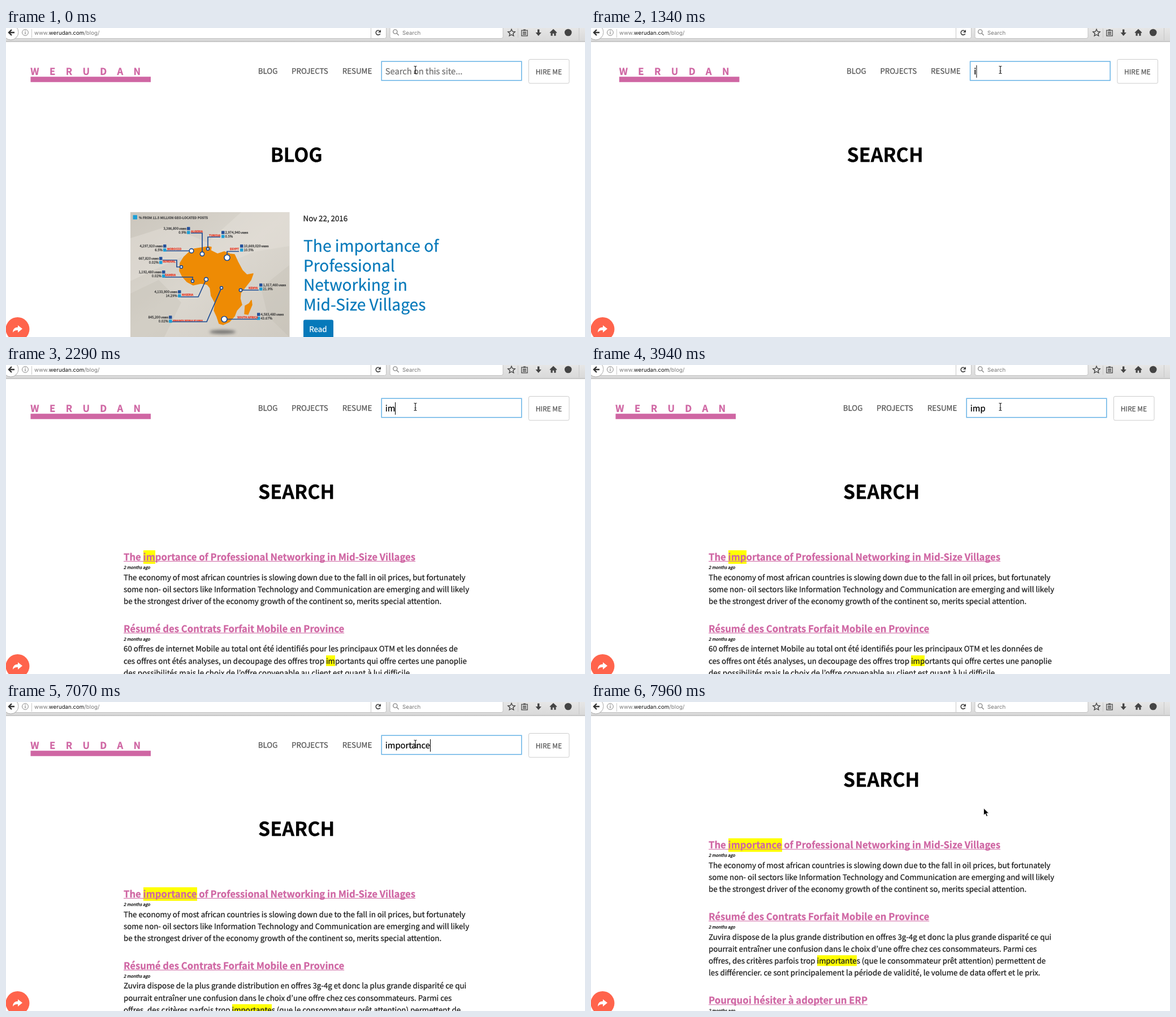
An HTML page for the animation above (8000 ms loop, 1024 px wide and 547 px high).

```html
<!DOCTYPE html>
<html lang="en">
<head>
<meta charset="utf-8">
<title>Site search</title>
<style>
html, body { margin: 0; width: 100%; height: 100%; overflow: hidden; background: #fff; }
svg { display: block; width: 1024px; height: 547px; }
text {
  font-family: "Noto Sans CJK JP", "Noto Sans CJK SC", "Noto Sans CJK KR", "Noto Sans CJK TC", "Noto Sans CJK", sans-serif;
  text-rendering: geometricPrecision;
  white-space: pre;
  stroke-width: .25px;
}
.ui text { font-family: Inter, "Liberation Sans", sans-serif; stroke: none; }
</style>
</head>
<body>
<svg id="stage" viewBox="0 0 1024 547">
  <defs>
    <linearGradient id="chrome" x2="0" y2="1">
      <stop offset="0" stop-color="#e6e6e6"/><stop offset="1" stop-color="#d8d8d8"/>
    </linearGradient>
    <linearGradient id="paper" x2="1" y2="1">
      <stop offset="0" stop-color="#cbc6bd"/><stop offset=".5" stop-color="#dbd7cf"/><stop offset="1" stop-color="#cfcac1"/>
    </linearGradient>
    <filter id="soft" x="-50%" y="-150%" width="200%" height="400%"><feGaussianBlur stdDeviation="2.5"/></filter>
    <clipPath id="photo"><path d="M220 326h281.5v222H220z"/></clipPath>
  </defs>

  <g id="page">
    <g id="header">
      <path d="M43.5 86.2H256v9.6H43.5z" fill="#cf66a3"/>
      <rect x="924.5" y="55.5" width="71.5" height="42.5" rx="2.5" fill="#fff" stroke="#ccc"/>
      <rect x="664.2" y="59.2" width="247.6" height="33.6" fill="#fff" stroke="#67b3e6" stroke-width="1.5"/>
    </g>
    <g id="blog">
      <g id="map" clip-path="url(#photo)">
        <path d="M220 326h282v222H220z" fill="url(#paper)"/>
        <path d="M220 372l70-22 66 30 60-54h85v60l-62 10-70 30-60-20-89 42z" fill="#e4e1da" opacity=".45"/>
        <path d="M220 470l50-24 40 40-30 61h-60zM501 420l-50 40 12 50 38 37z" fill="#b9b3a8" opacity=".25"/>
        <ellipse cx="383" cy="538" rx="23" ry="3.5" fill="#555" opacity=".75" filter="url(#soft)"/>
        <path fill="#ee8b04" stroke="#ee8b04" stroke-width="1.5" stroke-linejoin="round" d="M327 394L333 391 346 389 358 387 363 388 362 394 374 400 386 396 396 400 404 401 410 414 418 429 426 437 437 435 433 446 422 460 415 469 414 479 417 490 408 500 404 510 395 520 384 525 377 523 373 511 368 500 370 487 363 474 361 460 356 454 345 452 331 455 320 449 312 440 307 430 308 416 315 405zM434 482L435 490 428 507 422 506 423 492 430 488z"/>
      </g>
      <rect x="526" y="516.5" width="53" height="40" rx="3" fill="#0679ba"/>
    </g>
    <g id="results"><g id="marks" fill="#ff0"></g></g>
  </g>

  <g class="ui" id="chromeBar">
    <path d="M0 0h1024v24H0z" fill="url(#chrome)"/>
    <path d="M0 24h1024" stroke="#bcbcbc" stroke-width="1.4"/>
    <g fill="#fff" stroke="#c2c2c2">
      <rect x="12" y="-6" width="660.5" height="24.5" rx="3"/>
      <rect x="679" y="-6" width="200" height="24.5" rx="3"/>
      <circle cx="8.5" cy="7.5" r="13.5" stroke="#a9a9a9"/>
    </g>
    <path d="M45.5 2v15M645.5 0v18M905.5 1v16M1013.5 0v22" stroke="#c8c8c8"/>
    <g fill="none" stroke="#444" stroke-width="2">
      <path d="M15 8H5M10 3L5 8l5 5" stroke="#333" stroke-width="2.4"/>
      <path d="M661.5 6a4 4 0 1 0 .3 4" stroke-width="1.6"/>
      <path d="M663 3v5h-5z" fill="#444" stroke="none"/>
      <g stroke="#888" stroke-width="1.4"><circle cx="688.3" cy="6.5" r="3.6"/><path d="M691 9.2l3.6 3.8"/></g>
      <path d="M894 2.2l1.8 4 4.4.5-3.3 2.9.9 4.3-3.8-2.2-3.8 2.2.9-4.3-3.3-2.9 4.4-.5z" stroke-width="1.4"/>
      <path d="M911.8 4.2h10.4v9.6h-10.4zM914 7.2h6M914 9.2h6M914 11.4h6" stroke-width="1.2"/>
      <path d="M915 2.5h4v2h-4z" fill="#444" stroke="none"/>
      <path d="M940 2.5h3.4V8h3.4l-5.1 6-5.1-6h3.4z" fill="#444" stroke="none"/>
      <path d="M968 1.8l6.5 6.2-1 1-1-.8v5.6h-3.2v-4h-2.6v4h-3.2V8.2l-1 .8-1-1z" fill="#444" stroke="none"/>
    </g>
    <circle cx="994.2" cy="8" r="6.3" fill="#444"/>
    <g fill="none" stroke="#888"><circle cx="34" cy="8" r="5.4"/><path d="M34 7v4M34 4.6v1.3" stroke-width="1.3"/></g>
  </g>

  <g id="share">
    <circle cx="20.5" cy="533" r="21" fill="#ff644c"/>
    <path d="M21 526.2l8 6.4-8 6.4v-4c-4.5-.3-7 1-8.8 4-.2-5.5 2.5-9 8.8-9.3z" fill="#fff"/>
  </g>
  <path id="beam" fill="none" stroke="#222" stroke-width="1.2" d="M-2.5-6.5q2.5 0 2.5 1.5q0-1.5 2.5-1.5M0-5v10M-2.5 6.5q2.5 0 2.5-1.5q0 1.5 2.5 1.5M-1.5 2h3"/>
  <path id="arrow" fill="#000" stroke="#fff" stroke-width=".8" d="M0 0v12.5l2.9-2.7 2 4.7 2.2-1-2-4.5h4z"/>
</svg>

<script>
const NS = 'http://www.w3.org/2000/svg';
const $ = id => document.getElementById(id);
const PINK = '#cf66a3', INK = '#1c1c1c', BODY = 13.345, LINE = 21.2;

function add(parent, tag, attrs, content = '') {
  const el = document.createElementNS(NS, tag);
  for (const k in attrs) el.setAttribute(k, attrs[k]);
  el.textContent = content;
  return parent.appendChild(el);
}
// A hairline stroke in the text colour gives the slightly heavier screen weight
const text = (parent, x, y, size, str, fill = INK, more = {}) =>
  add(parent, 'text', { x, y, 'font-size': size, fill, stroke: fill, ...more }, str);
const bold = { 'font-weight': 700 };
const show = (el, on) => { el.style.visibility = on ? 'visible' : 'hidden'; };

// Browser bar
const url = text($('chromeBar'), 50, 12.3, 9.7, '', '#777');
add(url, 'tspan', {}, 'www.');
add(url, 'tspan', { fill: '#111' }, 'werudan.com');
add(url, 'tspan', {}, '/blog/');
text($('chromeBar'), 701, 12.3, 9.7, 'Search', '#777');

// Page header
const header = $('header');
text(header, 43.3, 82.6, 16.7, 'WERUDAN', PINK, { ...bold, 'letter-spacing': 18.4 });
[['BLOG', 445.7], ['PROJECTS', 505], ['RESUME', 594.7]].forEach(([s, x]) => text(header, x, 81.1, BODY, s, '#555'));
text(header, 936.7, 81.6, 12, 'HIRE ME', '#555');
const hint = text(header, 670.8, 82.3, 14.7, 'Search on this site...', '#717171');
const input = text(header, 670.8, 82.3, 14.7, '', '#000');
const caret = add(header, 'rect', { y: 66, width: 1, height: 22, fill: '#000' });
const heading = text($('page'), 513.7, 236.8, 34, 'BLOG', '#000', { ...bold, 'text-anchor': 'middle' });

// Blog post
const blog = $('blog');
text(blog, 525.5, 342.3, BODY, 'Nov 22, 2016');
['The importance of', 'Professional', 'Networking in', 'Mid-Size Villages']
  .forEach((s, i) => text(blog, 526, 396 + i * 34.7, 28.1, s, '#0679ba'));
text(blog, 536.3, 538.4, BODY, 'Read', '#fff', { 'font-weight': 500 });

// Map labels: name, name x, users, share, icon x, icon y, text side, ring radius, leader line
const labels = [
  ['ALGERIA', 327, '3,386,800', '0.9%', 320, 355, -1, 3.6, 'M327 363h20v37'],
  ['TUNISIA', 359, '2,974,940', '0.5%', 381, 362, 1, 2.4, 'M379 370h-22v21'],
  ['MOROCCO', 285, '4,297,920', '6.5%', 278, 386, -1, 3.8, 'M283 394.5h45'],
  ['EGYPT', 396, '10,669,020', '10.5%', 414, 386, 1, 5, 'M412 395.5h-21v11'],
  ['SENEGAL', 277, '667,820', '0.02%', 271, 408, -1, 2.4, 'M277 411h25v12h8'],
  ['GAMBIA', 281, '1,192,480', '0.02%', 276, 432, -1, 2.4, 'M277 441h53v7'],
  ['NIGERIA', 311, '4,133,900', '14.29%', 304, 467, -1, 3.4, 'M305 476h35l14-31'],
  ['DEMOCRATIC REPUBLIC OF CONGO', 295, '845,200', '0.02%', 288, 512, -1, 2.4, 'M290 520h65l26-60'],
  ['KENYA', 429, '1,317,460', '21.9%', 448, 455, 1, 2.6, 'M447 464h-32'],
  ['SOUTH AFRICA', 409, '4,583,480', '43.67%', 444, 507, 1, 5, 'M446 515.5h-60']
];
const map = $('map');
const square = (x, y, size, fill) => add(map, 'rect', { x, y: y - size / 2, width: size, height: size, rx: .6, fill });
square(224.5, 335, 7.5, '#1d9fd6');
text(map, 235, 337.8, 5.7, '% FROM 11.5 MILLION GEO-LOCATED POSTS', '#4a4a4a', bold);
for (const [name, nx, users, share, ix, iy, side, r, d] of labels) {
  const line = add(map, 'path', { d, fill: 'none', stroke: '#1d4c94', 'stroke-width': 1.7 });
  const end = line.getPointAtLength(line.getTotalLength());
  add(map, 'circle', { cx: end.x, cy: end.y, r, fill: '#fff', stroke: '#1d4c94', 'stroke-width': 1.7 });
  square(ix, iy, 5.5, '#24509a');
  square(ix, iy + 7, 5.5, '#1d9fd6');
  const anchor = { 'text-anchor': side < 0 ? 'end' : 'start' };
  const tx = side < 0 ? ix - 1 : ix + 6.5;
  const count = text(map, tx, iy + 2, 6, users, '#3c3c3c', anchor);
  add(count, 'tspan', { 'font-size': 4, ...bold }, ' USERS');
  text(map, tx, iy + 9, 6, share, '#3c3c3c', anchor);
  text(map, nx, iy + 6.5, name.length > 15 ? 3.1 : 5, name, '#e8321e', bold);
}

// Search results; each line may be highlighted
const results = $('results'), marks = $('marks'), lines = [];
function line(parent, y, size, str, fill, more) {
  const el = text(parent, 208, y, size, str, fill, more);
  lines.push({ el, y, size, str, parent });
  return el;
}
function title(parent, y, str) {
  const el = line(parent, y, 16.7, str, PINK, bold);
  add(parent, 'rect', { x: 208, y: Math.round(y + 1), width: el.getComputedTextLength(), height: 1, fill: PINK });
  text(parent, 208, y + 14.8, 7.4, '2 months ago', '#000', { 'font-style': 'italic' });
}
const para = (parent, y, rows) => rows.forEach((s, i) => line(parent, y + i * LINE, BODY, s));

title(results, 346, 'The importance of Professional Networking in Mid-Size Villages');
para(results, 380.7, [
  'The economy of most african countries is slowing down due to the fall in oil prices, but fortunately',
  'some non- oil sectors like Information Technology and Communication are emerging and will likely',
  'be the strongest driver of the economy growth of the continent so, merits special attention.'
]);
title(results, 473, 'Résumé des Contrats Forfait Mobile en Province');
const early = add(results, 'g'), late = add(results, 'g');
para(early, 507.3, [
  '60 offres de internet Mobile au total ont été identifiés pour les principaux OTM et les données de',
  'ces offres ont étés analyses, un decoupage des offres trop importants qui offre certes une panoplie',
  'des possibilités mais le choix de l’offre convenable au client est quant à lui difficile.'
]);
para(late, 507.3, [
  'Zuvira dispose de la plus grande distribution en offres 3g-4g et donc la plus grande disparité ce qui',
  'pourrait entraîner une confusion dans le choix d’une offre chez ces consommateurs. Parmi ces',
  'offres, des critères parfois trop importantes (que le consommateur prêt attention) permettent de',
  'les différencier. ce sont principalement la période de validité, le volume de data offert et le prix.'
]);
title(late, 620.7, 'Pourquoi hésiter à adopter un ERP');

function highlight(query, full) {
  marks.replaceChildren();
  if (!query) return;
  const find = new RegExp('(?<![\\p{L}’])' + query, 'giu');
  for (const { el, y, size, str, parent } of lines) {
    if (parent === (full ? early : late)) continue;
    for (const m of str.matchAll(find)) {
      const before = m.index ? el.getSubStringLength(0, m.index) : 0;
      add(marks, 'rect', {
        x: Math.round(208 + before), y: Math.round(y - 1.08 * size),
        width: Math.round(el.getSubStringLength(m.index, m[0].length)), height: Math.round(1.44 * size)
      });
    }
  }
}

// Each step changes part of the state and holds until the next
const LOOP = 8000;
const steps = [
  [0, { search: false, typed: '', caret: false, query: '', shift: 0, scroll: 0, mouse: [724, 74], beam: true }],
  [600, { caret: true }],
  [1050, { typed: 'i' }],
  [1190, { search: true, shift: 6.4 }],
  [1780, { query: 'i', shift: 0 }],
  [1960, { typed: 'im' }],
  [2290, { query: 'im' }],
  [2440, { caret: false }],
  [3040, { caret: true }],
  [3340, { typed: 'imp' }],
  [3790, { query: 'imp' }],
  [3940, { caret: false }],
  [4530, { typed: 'impo', caret: true }],
  [4830, { typed: 'impor' }],
  [5120, { typed: 'import' }],
  [5420, { typed: 'importa' }],
  [6020, { typed: 'importan', query: 'importa' }],
  [6170, { typed: 'importanc' }],
  [6620, { typed: 'importance', query: 'importan' }],
  [7070, { query: 'importanc?t?e' }],
  [7220, { mouse: [714, 118], beam: false }],
  [7370, { mouse: [694.5, 188] }],
  [7520, { scroll: 12 }],
  [7660, { scroll: 40 }],
  [7810, { scroll: 70 }],
  [7960, { scroll: 86.7 }]
];
let state = {};
const states = steps.map(([at, change]) => [at, state = { ...state, ...change }]);

function render(s) {
  const full = s.query.endsWith('e');
  $('page').setAttribute('transform', `translate(${s.shift} ${-s.scroll})`);
  heading.textContent = s.search ? 'SEARCH' : 'BLOG';
  input.textContent = s.typed;
  caret.setAttribute('x', 671 + (s.typed ? Math.round(input.getComputedTextLength() - .4) : 0));
  show(hint, !s.typed);
  show(caret, s.caret);
  show(blog, !s.search);
  show(results, s.query);
  show(early, s.query && !full);
  show(late, full);
  highlight(s.query, full);
  for (const id of ['beam', 'arrow']) {
    $(id).setAttribute('transform', `translate(${s.mouse})`);
    show($(id), (id === 'beam') === s.beam);
  }
}

const start = performance.now();
let current;
function tick() {
  const t = (performance.now() - start) % LOOP;
  const next = states.findLast(([at]) => at <= t)[1];
  if (next !== current) render(current = next);
  requestAnimationFrame(tick);
}
tick();
</script>
</body>
</html>
```
